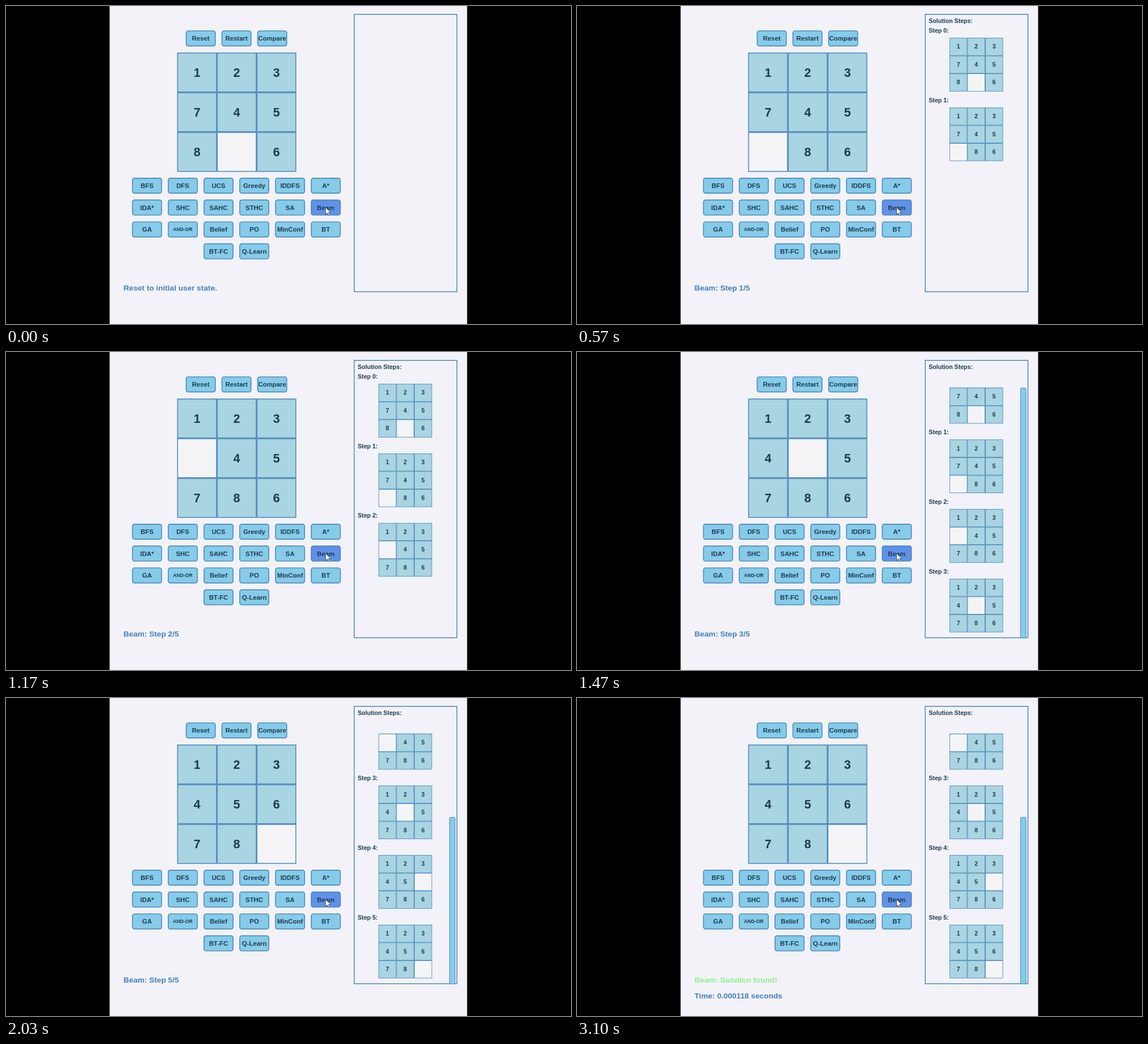
An HTML page that plays this animation: 998 px wide and 561 px high, repeating every 3230 ms.

```html
<!DOCTYPE html>
<html lang="en">
<head>
<meta charset="utf-8">
<title>Sliding puzzle solver</title>
<style>
  html, body { margin: 0; width: 100%; height: 100%; overflow: hidden; background: #000; }
  svg { display: block; width: 998px; height: 561px; }
  text { font-family: "Liberation Sans", Arial, sans-serif; font-weight: bold; fill: #1d3b4e; }
  .mid { text-anchor: middle; }
</style>
</head>
<body>
<svg id="stage" viewBox="0 0 998 561" xmlns="http://www.w3.org/2000/svg">
  <defs>
    <clipPath id="scrolled"><rect x="616" y="62.8" width="180" height="441"/></clipPath>
  </defs>
</svg>
<script>
const LOOP = 3230;
const STEP_TIMES = [260, 565, 880, 1195, 1495, 1810];
const SOLVED_TIME = 2100;
const STATES = ['12374586 ', '123745 86', '123 45786', '1234 5786', '12345 786', '12345678 '];
STATES[0] = '1237458 6';

const PAPER = '#f2f2f8', TILE = '#a9d4e1', LINE = '#3f80b8';
const BUTTON = '#86cbe9', HOVER = '#6091e8', STATUS = '#4480ba', SUCCESS = '#90ee90';
const PITCH = 122.75, VIEW_TOP = 63, VIEW_HEIGHT = 441, VISIBLE_STEPS = 4;

const stage = document.getElementById('stage');

function add(parent, tag, attrs, content) {
  const node = document.createElementNS('http://www.w3.org/2000/svg', tag);
  for (const key in attrs) node.setAttribute(key, attrs[key]);
  if (content !== undefined) node.textContent = content;
  parent.appendChild(node);
  return node;
}

function box(parent, x, y, width, height, fill, strokeWidth, rx = 0) {
  return add(parent, 'rect', {
    x: x + strokeWidth / 2, y: y + strokeWidth / 2,
    width: width - strokeWidth, height: height - strokeWidth,
    rx, fill, stroke: LINE, 'stroke-width': strokeWidth
  });
}

function label(parent, x, y, size, content, centered) {
  const attrs = { x, y: y + size * 0.355, 'font-size': size };
  if (centered) attrs.class = 'mid';
  return add(parent, 'text', attrs, content);
}

function button(name, cx, cy) {
  box(stage, cx - 26.4, cy - 14, 52.8, 28, name === 'Beam' ? HOVER : BUTTON, 1.4, 3.5);
  label(stage, cx, cy, name === 'AND-OR' ? 8.6 : 11.4, name, true);
}

// Returns a function that shows a given puzzle state.
function makeBoard(parent, x, y, cell, border, size) {
  const tiles = Array.from({ length: 9 }, (_, i) => {
    const left = x + (i % 3) * cell, top = y + Math.floor(i / 3) * cell;
    return {
      rect: box(parent, left, top, cell, cell, TILE, border),
      digit: label(parent, left + cell / 2, top + cell / 2 - 0.3, size, '', true)
    };
  });
  return state => tiles.forEach(({ rect, digit }, i) => {
    const value = state[i].trim();
    rect.setAttribute('fill', value ? TILE : '#f4f4f6');
    digit.textContent = value;
  });
}

function show(node, visible) {
  node.setAttribute('visibility', visible ? 'visible' : 'hidden');
}

add(stage, 'rect', { width: 998, height: 561 });
add(stage, 'rect', { x: 183, width: 631.5, height: 561, fill: PAPER });

['Reset', 'Restart', 'Compare'].forEach((name, i) => button(name, 344 + 63.1 * i, 57.2));
[
  ['BFS', 'DFS', 'UCS', 'Greedy', 'IDDFS', 'A*'],
  ['IDA*', 'SHC', 'SAHC', 'STHC', 'SA', 'Beam'],
  ['GA', 'AND-OR', 'Belief', 'PO', 'MinConf', 'BT'],
  ['BT-FC', 'Q-Learn']
].forEach((row, r) => row.forEach((name, c) =>
  button(name, 407 + 63.15 * (c - (row.length - 1) / 2), 317 + 38.6 * r)));

const showBoard = makeBoard(stage, 302.4, 82.2, 70.1, 1.4, 21.5);
const status = label(stage, 207.5, 497.3, 13.65, '');
const timing = label(stage, 207.5, 525.4, 13.65, 'Time: 0.000118 seconds');
timing.style.fill = STATUS;

const panelText = label(stage, 621.3, 26, 10.6, 'Solution Steps:');
const viewport = add(stage, 'g', {});
const list = add(viewport, 'g', {});
const entries = STATES.map((state, i) => {
  const group = add(list, 'g', { transform: `translate(0 ${PITCH * i})` });
  label(group, 621.3, 43.2, 10.6, `Step ${i}:`);
  makeBoard(group, 658, 56.2, 31.5, 0.8, 10.4)(state);
  return group;
});
box(stage, 614.4, 14, 182.8, 490.8, 'none', 1.4);
const scrollbar = box(stage, 783, VIEW_TOP, 10.6, VIEW_HEIGHT, BUTTON, 0.9, 2);

add(stage, 'path', {
  d: 'M564.5 355.3v12.4l2.9-2.6 2 4.4 2.1-1-2-4.2h4z',
  fill: '#fff', stroke: '#26364a', 'stroke-width': 0.8, 'stroke-linejoin': 'round'
});

function render(time) {
  const step = STEP_TIMES.filter(start => time >= start).length - 1;
  const solved = time >= SOLVED_TIME;
  const count = step + 1;
  const scrolling = count >= VISIBLE_STEPS;

  showBoard(STATES[Math.max(step, 0)]);
  status.textContent = step < 0 ? 'Reset to initial user state.'
    : solved ? 'Beam: Solution found!' : `Beam: Step ${step}/5`;
  status.style.fill = solved ? SUCCESS : STATUS;
  show(timing, solved);
  show(panelText, step >= 0);
  entries.forEach((entry, i) => show(entry, i <= step));

  const offset = scrolling ? 24.5 + PITCH * (count - VISIBLE_STEPS) : 0;
  list.setAttribute('transform', `translate(0 ${-offset})`);
  viewport.setAttribute('clip-path', scrolling ? 'url(#scrolled)' : 'none');

  show(scrollbar, scrolling);
  if (scrolling) {
    const height = VIEW_HEIGHT * VISIBLE_STEPS / count;
    scrollbar.setAttribute('y', VIEW_TOP + VIEW_HEIGHT - height + 0.45);
    scrollbar.setAttribute('height', height);
  }
}

const start = performance.now();
function tick() {
  render((performance.now() - start) % LOOP);
  requestAnimationFrame(tick);
}
tick();
</script>
</body>
</html>
```
